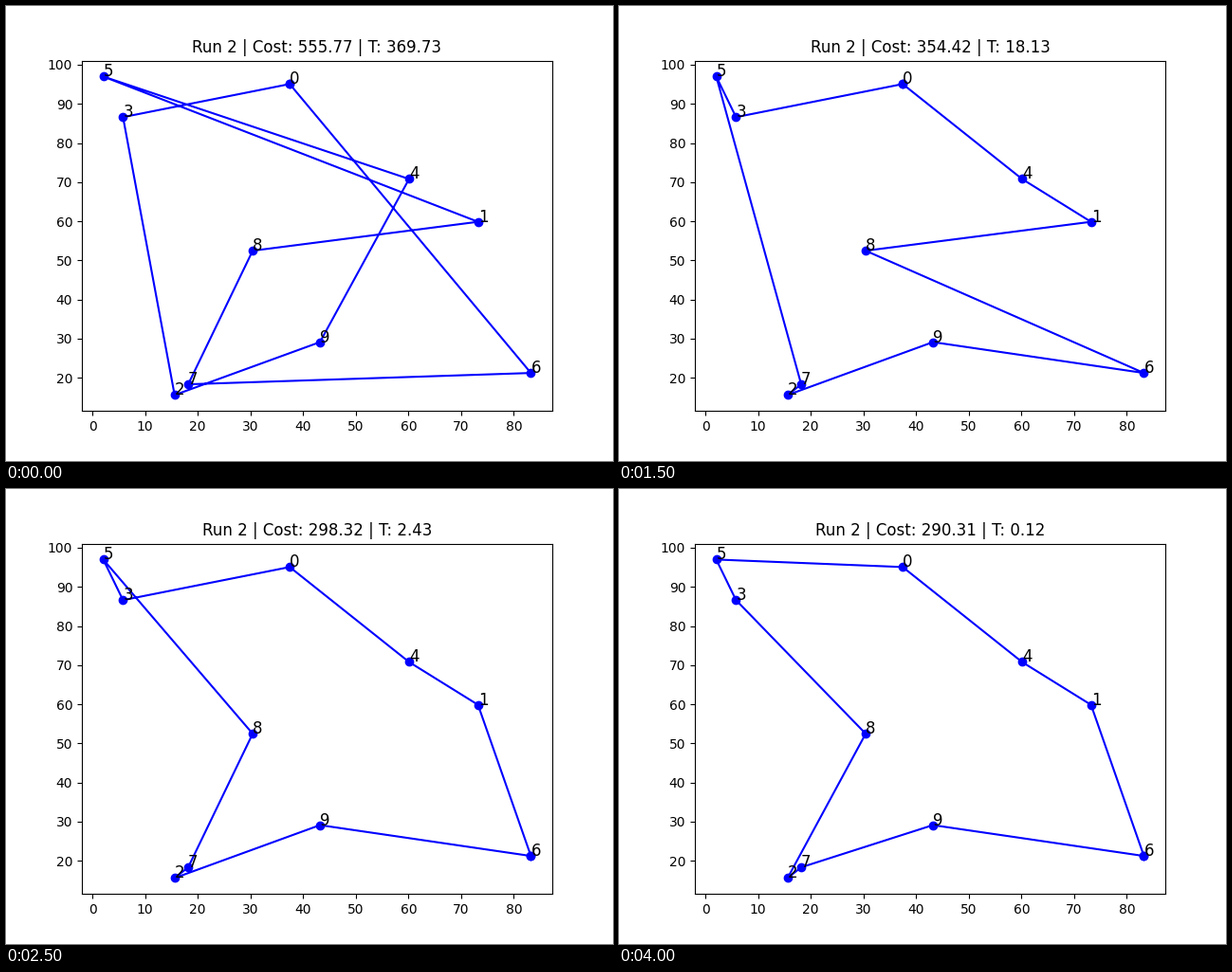
These frames come from a looping animation (640x480 px, 4.5 s). A matplotlib script:

```python
import matplotlib.pyplot as plt
import numpy as np
from matplotlib.animation import FuncAnimation

T_START, COOLING, SKIP = 1000, 0.99, 100

rng = np.random.RandomState(42)
cities = rng.rand(10, 2) * 100

# Visiting order each time the cooling is sampled
HOT = ["0678154923", "0162795438", "0461782953", "0418692753"]
WARM = "6140358729"
COLD, COLD_SWAP = "6140538279", "6140538729"
TOURS = HOT + [WARM, WARM, COLD, COLD_SWAP, COLD]


def closed_path(order):
    return cities[[int(c) for c in order + order[0]]]


def length(path):
    return np.hypot(*np.diff(path, axis=0).T).sum()


def temperature(step):
    return T_START * COOLING ** (SKIP * (step + 1) - 1)


fig, ax = plt.subplots(figsize=(6.4, 4.8), dpi=100)
route, = ax.plot(*cities.T, "bo-")
for i, (x, y) in enumerate(cities):
    ax.text(x, y, str(i), fontsize=12)
title = ax.set_title("")


def draw(step):
    path = closed_path(TOURS[step])
    route.set_data(*path.T)
    title.set_text(f"Run 2 | Cost: {length(path):.2f} | T: {temperature(step):.2f}")
    return route, title


anim = FuncAnimation(fig, draw, frames=len(TOURS), interval=500,
                     repeat=True, repeat_delay=0, blit=False)
plt.show()
```
